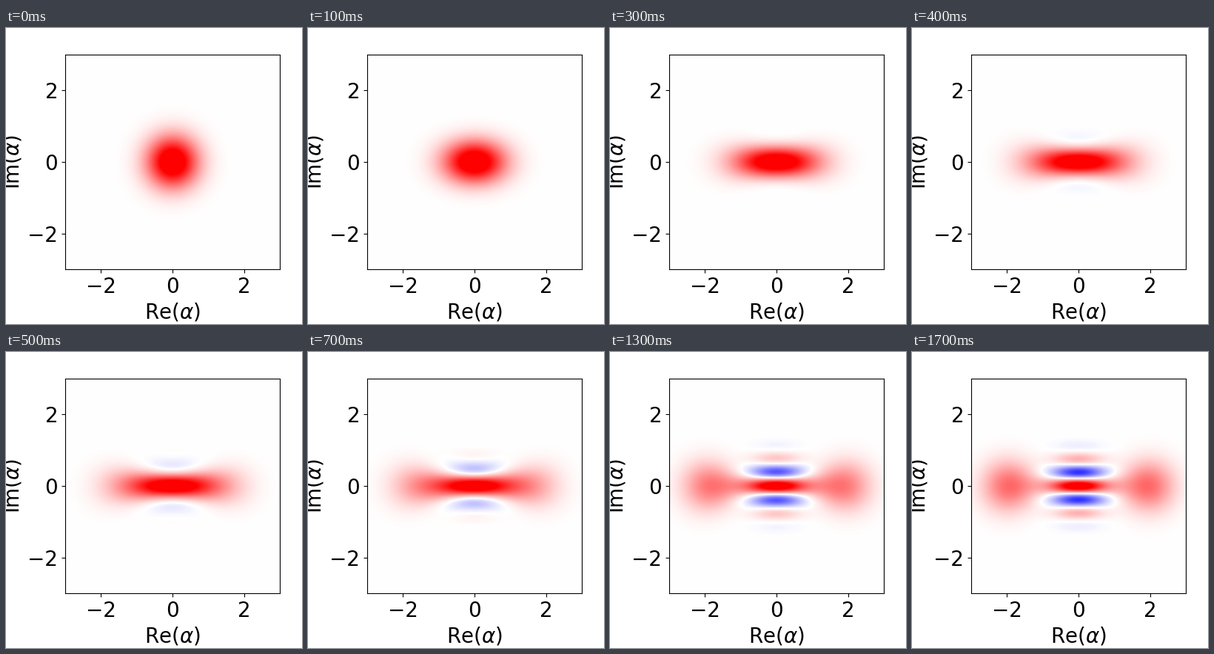
These frames come from a looping animation (400 by 400 pixels, 2.1 s). A matplotlib script:

```python
import math

import matplotlib.pyplot as plt
import numpy as np
from matplotlib.animation import FuncAnimation

FRAMES, INTERVAL = 21, 100
ALPHA, T_END = 2.0, 1.0   # cat size, final time in units of 1/kappa
LEVELS = 16               # even Fock states 0, 2, ..., 30
LIM, HALF = 3.0, 145      # axis limit, pixels per half axis

plt.rcParams["font.family"] = "DejaVu Sans"
plt.rcParams["font.size"] = 20


def laguerre(m, k, x):
    prev, cur = np.zeros_like(x), np.ones_like(x)
    for j in range(m):
        prev, cur = cur, ((2 * j + 1 + k - x) * cur - (j + k) * prev) / (j + 1)
    return cur


def wigner_basis():
    """Wigner maps of the even Fock pairs on the positive quadrant."""
    axis = (np.arange(HALF) + 0.5) * LIM / HALF
    beta = axis[None, :] + 1j * axis[:, None]
    r2 = np.abs(beta) ** 2
    gauss = 2 / math.pi * np.exp(-2 * r2)
    basis = np.empty((LEVELS, LEVELS, HALF, HALF))
    for i in range(LEVELS):
        for j in range(i, LEVELS):
            m, n = 2 * i, 2 * j
            scale = math.sqrt(math.factorial(m) / math.factorial(n))
            lobe = ((2 * beta) ** (n - m)).real
            basis[i, j] = basis[j, i] = scale * gauss * lobe * laguerre(m, n - m, 4 * r2)
    return basis


def evolve(substeps=60):
    """Two-photon driven dissipation from the vacuum, one state per frame."""
    n = 2 * np.arange(1, LEVELS)
    jump = np.diag(np.sqrt(n * (n - 1.0)), 1) - ALPHA**2 * np.eye(LEVELS)
    decay = jump.T @ jump / 2

    def rate(rho):
        return jump @ rho @ jump.T - decay @ rho - rho @ decay

    rho = np.zeros((LEVELS, LEVELS))
    rho[0, 0] = 1
    h = T_END / (FRAMES - 1) / substeps
    states = [rho]
    for _ in range(FRAMES - 1):
        for _ in range(substeps):
            k1 = rate(rho)
            k2 = rate(rho + h / 2 * k1)
            k3 = rate(rho + h / 2 * k2)
            k4 = rate(rho + h * k3)
            rho = rho + h / 6 * (k1 + 2 * k2 + 2 * k3 + k4)
        states.append(rho)
    return states


def unfold(quad):
    right = np.vstack([quad[::-1], quad])
    return np.hstack([right[:, ::-1], right])


basis = wigner_basis()
maps = [unfold(np.tensordot(rho, basis, 2)) for rho in evolve()]

fig = plt.figure(figsize=(4, 4), dpi=100)
ax = fig.add_axes([0.2, 0.185, 0.725, 0.725])
image = ax.imshow(maps[0], cmap="bwr", vmin=-0.5, vmax=0.5, origin="lower",
                  extent=[-LIM, LIM, -LIM, LIM], interpolation="nearest")
ax.set_xticks([-2, 0, 2])
ax.set_yticks([-2, 0, 2])
ax.set_xlabel(r"Re($\alpha$)")
ax.set_ylabel(r"Im($\alpha$)")


def draw(frame):
    image.set_data(maps[frame])
    return [image]


anim = FuncAnimation(fig, draw, frames=FRAMES, interval=INTERVAL, repeat=True)
plt.show()
```
